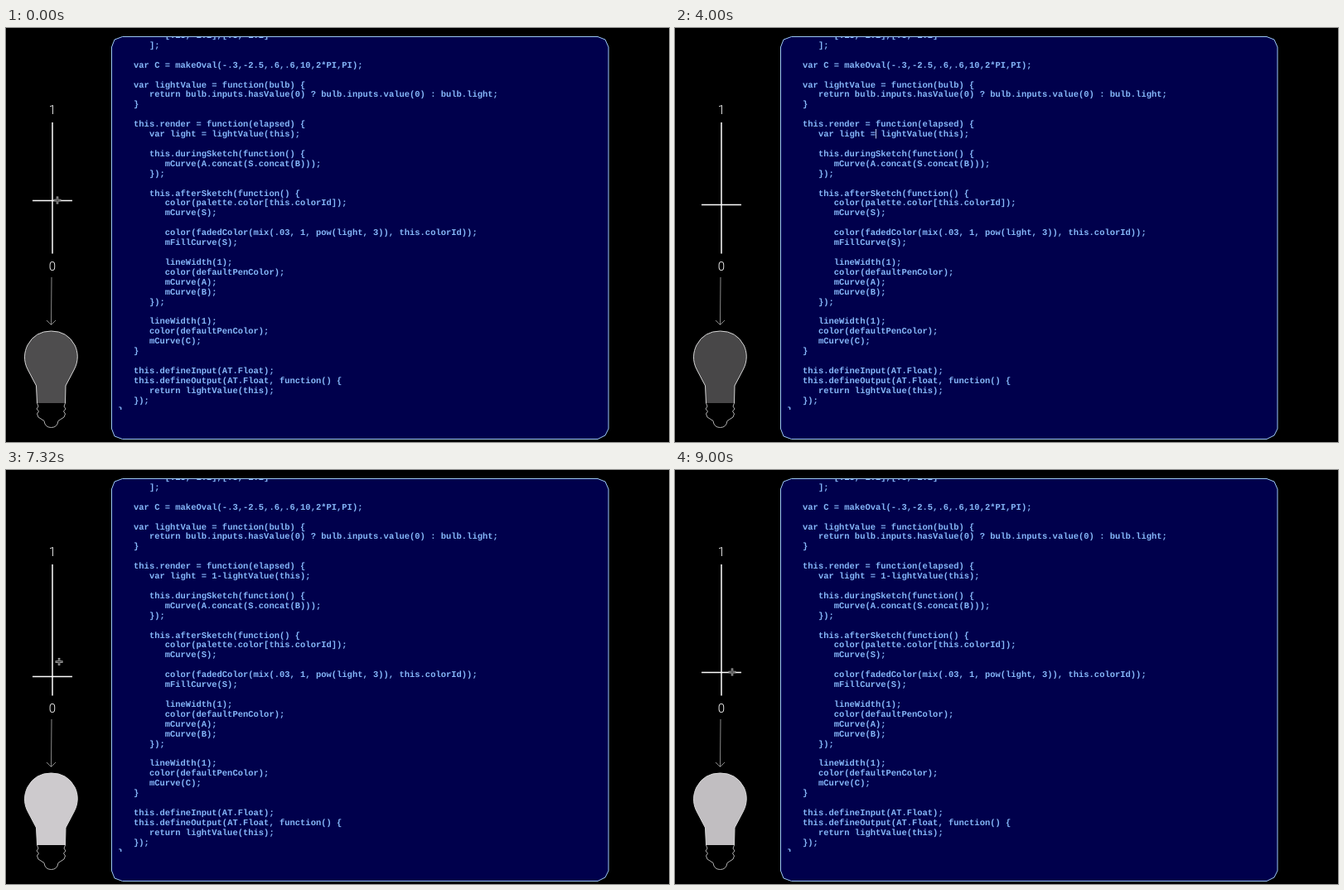
These frames come from a looping animation (800 by 500 pixels, 9200 ms). An HTML page:

```html
<!DOCTYPE html>
<html lang="en">
<head>
<meta charset="utf-8">
<title>Light bulb code</title>
<style>
  html, body { margin: 0; width: 100%; height: 100%; overflow: hidden; background: #000; }
  svg { display: block; width: 800px; height: 500px; fill: none; }
  #code { font: bold 10.47px "Liberation Mono", monospace; fill: #86b8fa; text-rendering: geometricPrecision; }
  .label { font: 300 15px Roboto, sans-serif; fill: #fff; text-anchor: middle; }
  .white { stroke: #fff; stroke-width: 1.5; }
</style>
</head>
<body>
<svg viewBox="0 0 800 500">
  <clipPath id="view"><rect x="128" y="11" width="598" height="450"/></clipPath>
  <path d="M140.5 10.5H714L723 14 727 23V484L723 492 714 496.5H140.5L131 493 127.5 484V23L131 14Z" fill="#00004c" stroke="#9cc8f4"/>
  <g id="code" clip-path="url(#view)"></g>

  <text class="label" x="56" y="103.5">1</text>
  <text class="label" x="56" y="293.3">0</text>
  <path class="white" d="M56 114V272.5"/>
  <path class="white" id="slider" d="M32 .4H80"/>
  <path d="M55 301L54.5 358M49 353L54.5 358.5 60 353" stroke="#8a8a8a"/>

  <path id="bulb" stroke="#d8d8d8" d="M37.5 453L36.5 432 26.500 413C20.500 402 22 391 26 383Q35 366 54.500 366T83 383C87 391 88 402 82 413L72 432 71.500 453"/>
  <path stroke="#b0b0b0" d="M37.500 453l1.500 4-2 3 2.500 3-2 3 1.500 4 7 4.500q1 8 8.500 8t8.500-8l7-4.500 1.500-4-2-3 2.500-3-2-3 1.500-4"/>

  <path id="caret" d="M0 122V133.500" stroke="#b4c4e4"/>
  <g id="cross">
    <path d="M-4.500 0H4.500M0-4.500V4.500" stroke="#a4a4a4" stroke-width="2.600"/>
    <path d="M-3.500 0H3.500M0-3.500V3.500" stroke="#333" stroke-width=".9"/>
  </g>
  <path id="beam" d="M-2.500-6L0-5 2.500-6M0-5V5M-2.500 6L0 5 2.500 6" stroke="#a8a8b8"/>
</svg>
<script>
const LOOP = 9200, STEP = 40, SLIDER_LAG = 80, BULB_LAG = 110;
const REST_Y = 213, TOP = 114, BOTTOM = 272;
const ROW = 11.91, CHAR = 6.283, LEFT = 135.2, FIRST_BASELINE = 12;

const source = `
         [.15, 1.2],[.5, 1.2]
      ];

   var C = makeOval(-.3,-2.5,.6,.6,10,2*PI,PI);

   var lightValue = function(bulb) {
      return bulb.inputs.hasValue(0) ? bulb.inputs.value(0) : bulb.light;
   }

   this.render = function(elapsed) {
      var light = lightValue(this);

      this.duringSketch(function() {
         mCurve(A.concat(S.concat(B)));
      });

      this.afterSketch(function() {
         color(palette.color[this.colorId]);
         mCurve(S);

         color(fadedColor(mix(.03, 1, pow(light, 3)), this.colorId));
         mFillCurve(S);

         lineWidth(1);
         color(defaultPenColor);
         mCurve(A);
         mCurve(B);
      });

      lineWidth(1);
      color(defaultPenColor);
      mCurve(C);
   }

   this.defineInput(AT.Float);
   this.defineOutput(AT.Float, function() {
      return lightValue(this);
   });
}`.slice(1).split("\n");

// A drag swings between turning heights; a slowing above 1 lengthens each swing.
const drags = [
  { start: 40, swing: 300, slowing: 1, x: [62, 79], turns: [208, 118, 250, 146, 256, 160, REST_Y] },
  { start: 6660, swing: 240, slowing: 1.22, x: [61, 69], turns: [REST_Y, 113, 250, 150, 252, 200, 244] }
];

// Moves between the slider and the code
const glides = [
  { start: 2360, end: 3320, from: [79, REST_Y], to: [242.5, 128] },
  { start: 4960, end: 5480, from: [254, 128], to: [20, 200] },
  { start: 5480, end: 5920, from: [20, 200], to: [61, REST_Y + 3] }
];

const $ = id => document.getElementById(id);
const place = (el, x, y) => el.setAttribute("transform", `translate(${x} ${y})`);
const show = (el, on) => { el.style.display = on ? "" : "none"; };
const clamp = (v, min, max) => Math.min(max, Math.max(min, v));
const mix = (a, b, k) => a + (b - a) * k;
const ease = k => (1 - Math.cos(Math.PI * clamp(k, 0, 1))) / 2;

const rows = source.map((line, i) => {
  const row = document.createElementNS("http://www.w3.org/2000/svg", "text");
  row.setAttribute("x", LEFT + line.search(/\S|$/) * CHAR);
  row.setAttribute("y", FIRST_BASELINE + i * ROW);
  row.textContent = line.trim();
  $("code").append(row);
  return row;
});
const edited = rows[source.findIndex(line => line.includes("var light ="))];

function dragPoint({ start, swing, slowing, x, turns }, t) {
  const last = turns.length - 1;
  const phase = clamp(Math.max(0, t - start) / swing, 0, last ** slowing) ** (1 / slowing);
  const i = Math.min(Math.floor(phase), last - 1);
  const from = swing * i ** slowing, to = swing * (i + 1) ** slowing;
  const k = ease((t - start - from) / (to - from));
  return [mix(...x, phase / last), mix(turns[i], turns[i + 1], k)];
}

function pointer(t) {
  const glide = glides.findLast(g => t >= g.start);
  if (!glide) return dragPoint(drags[0], t);
  if (t >= drags[1].start) return dragPoint(drags[1], t);
  const k = ease((t - glide.start) / (glide.end - glide.start));
  return glide.from.map((v, i) => mix(v, glide.to[i], k));
}

const sliderY = t => dragPoint(drags[t < drags[1].start ? 0 : 1], t)[1];

function draw(t) {
  const [x, y] = pointer(t);
  const typing = t >= 3640 && t < 5000;
  const overCode = x > 127;
  place($("slider"), 0, sliderY(t - SLIDER_LAG));

  const value = (BOTTOM - sliderY(t - BULB_LAG)) / (BOTTOM - TOP);
  const light = t >= 5240 ? 1 - value : value;
  const shade = 255 * Math.sqrt(mix(.03, 1, light ** 3));
  $("bulb").setAttribute("fill", `rgb(${shade},${shade * .985},${shade})`);

  const typed = t >= 4760 ? "1-" : t >= 4560 ? "1" : "";
  edited.textContent = `var light = ${typed}lightValue(this);`;

  show($("caret"), typing);
  place($("caret"), 242.5 + CHAR * ((t >= 4200) + typed.length), 0);
  show($("cross"), !overCode);
  place($("cross"), x, y);
  show($("beam"), overCode && !typing);
  place($("beam"), x, y);
}

const start = performance.now();
function frame() {
  const t = (performance.now() - start) % LOOP;
  draw(Math.floor(t / STEP) * STEP);
  requestAnimationFrame(frame);
}
frame();
</script>
</body>
</html>
```
